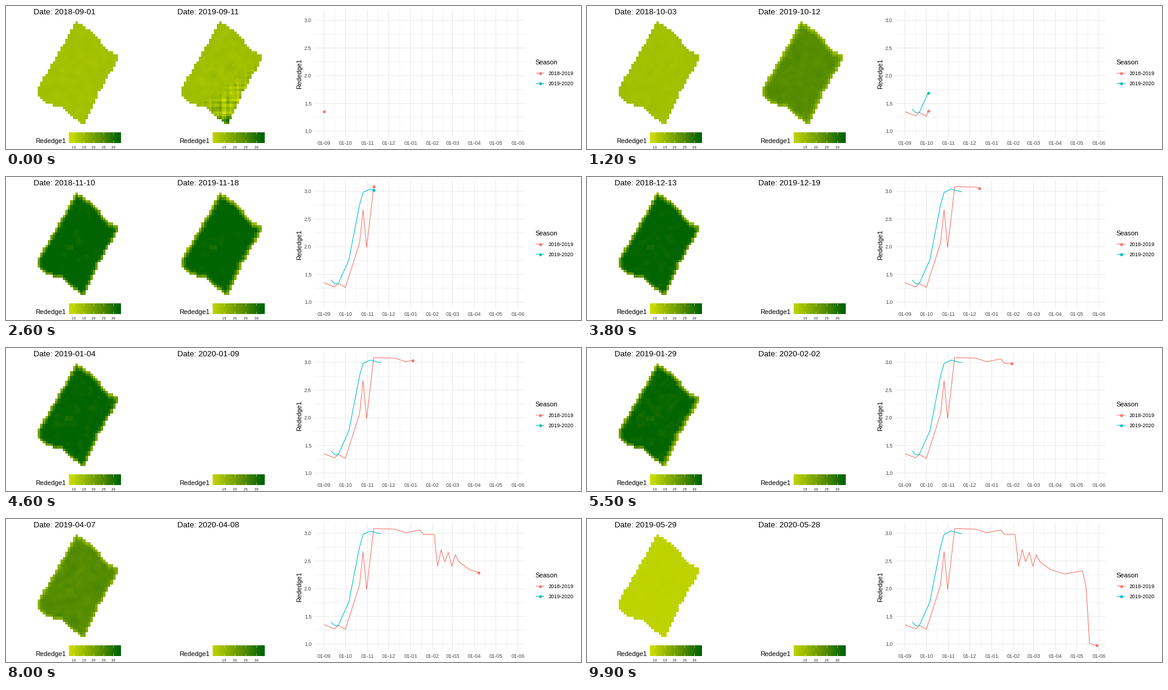
These frames come from a looping animation (960x240 px, 10000 ms). A matplotlib script:

```python
import numpy as np
import matplotlib.pyplot as plt
from matplotlib.animation import FuncAnimation
from matplotlib.colors import LinearSegmentedColormap, Normalize
from matplotlib.path import Path

W, H, DPI, FRAMES = 960, 240, 100, 100
LAST = FRAMES - 1
SPAN_A, SPAN_B, LEAD_B = 270, 260, 10
RED, TEAL, GREY = "#F8766D", "#00BFC4", "#4D4D4D"

plt.rcParams["font.family"] = "Liberation Sans"
rng = np.random.default_rng(11)

# Season means: turning points as (days since 1 September, Rededge1)
RISE_A = [(0, 1.35), (15, 1.275), (20, 1.34), (30, 1.265), (50, 2.065),
          (55, 2.67), (60, 1.985), (70, 3.085), (100, 3.075), (115, 3.01),
          (135, 3.06), (140, 2.98), (155, 2.98)]
SWINGS = [(160 + 5 * i,
           2.727 - .023 * i if i % 2 else 2.445 - .04 * np.cos(np.pi * i / 2))
          for i in range(7)]
FALL_A = [(205, 2.345), (225, 2.265), (250, 2.325), (255, 2.03), (260, 1.01),
          (270, .978)]
CURVE_A = RISE_A + SWINGS + FALL_A
CURVE_B = [(10, 1.4), (15, 1.333), (20, 1.333), (35, 1.763), (50, 2.753),
           (55, 2.98), (65, 3.04), (80, 2.99)]


def sample(curve):
    """Acquisitions every five days along a curve."""
    xs, ys = np.transpose(curve)
    days = np.arange(xs[0], xs[-1] + 1, 5)
    return days, np.interp(days, xs, ys)


def keys(days, span):
    """Animation step on which each acquisition lands."""
    return np.round(days * LAST / span)


DAYS_A, MEAN_A = sample(CURVE_A)
DAYS_B, MEAN_B = sample(CURVE_B)
KEYS_A, KEYS_B = keys(DAYS_A, SPAN_A), keys(DAYS_B, SPAN_A)
MAP_KEYS_B = keys(DAYS_B - LEAD_B, SPAN_B)

# Field outline on a 41 x 32 grid
ROWS, COLS = 41, 32
X0, X1, Y0, Y1 = 53, 187, 26, 198
OUTLINE = [(117, 26), (118.5, 26), (150.8, 49), (163, 67), (174, 76),
           (188, 81.5), (186, 91.5), (155, 146.5), (131, 198), (125, 198),
           (113.4, 187.5), (95, 169), (79, 167), (66, 164), (54, 151.5),
           (54, 136), (78.5, 95)]
row, col = np.mgrid[:ROWS, :COLS]
centres = np.column_stack([X0 + (col.ravel() + .5) * (X1 - X0) / COLS,
                           Y0 + (row.ravel() + .5) * (Y1 - Y0) / ROWS])
inside = Path(OUTLINE).contains_points(centres).reshape(ROWS, COLS)


def neighbour(mask, dr, dc):
    padded = np.pad(mask, 1)
    return padded[1 + dr:1 + dr + ROWS, 1 + dc:1 + dc + COLS]


def depth(dr, dc):
    """0 on the rim facing a direction, 1 behind it, 2 further in."""
    first = inside & neighbour(inside, dr, dc)
    second = first & neighbour(first, dr, dc)
    return first.astype(int) + second


DEPTHS = [depth(0, -1), depth(-1, 0), depth(0, 1), depth(1, 0)]


def texture():
    fine = rng.normal(size=(ROWS, COLS))
    soft = sum(np.roll(fine, (i, j), (0, 1))
               for i in (-1, 0, 1) for j in (-1, 0, 1)) / 3
    return .5 * fine + .7 * soft


base = texture()
TEX_A = [.5 * base + .7 * texture() for _ in DAYS_A]
TEX_B = [.5 * base + .7 * texture() for _ in DAYS_B]
jitter = rng.uniform(.75, 1.1, (ROWS, COLS))
spot = (abs(col - 12) <= 1) & (abs(row - 21.5) < 1)
slope = (COLS / 2 - col + (row - ROWS / 2) * .5) / COLS

# Bare strips in the south-east corner early in the second season
corner = np.clip((row - 14 - (31 - col) * .72) / 8, 0, 1)
strips = corner * (.3 * np.sin(2.2 * col) + .3 * np.sin(2.6 * row)
                   + .15 * base) + 1.1 * (row >= 38)


def bump(k, centre, width):
    return np.exp(-((k - centre) / width) ** 2)


def blend(stack, steps, k):
    pos = np.interp(k, steps, np.arange(len(steps)))
    i = min(int(pos), len(steps) - 2)
    return stack[i] + (pos - i) * (stack[i + 1] - stack[i])


def field(mean, rim, noise):
    """Cell values with a weaker rim (left, top, right, bottom)."""
    loss = np.max([np.clip(w - .45 * d, 0, 1) * (d < 2)
                   for w, d in zip(rim, DEPTHS)], axis=0)
    loss = loss * jitter * 1.4 * max(mean - 1.4, 0)
    loss = loss + spot * .2 * max(mean - 1.8, 0)
    value = mean + loss[inside].mean() - loss + noise
    return np.where(inside, value, np.nan)


def field_a(k):
    mean = np.interp(k, KEYS_A, MEAN_A)
    rise = bump(k, 19, 4)
    amp = np.clip(mean - .95, .1, 1) * (.07 + .06 * rise)
    rim = (.55, .7, .5 + .35 * bump(k, 62, 12), .45)
    noise = amp * blend(TEX_A, KEYS_A, k) + .55 * rise * slope
    return field(mean, rim, noise)


def field_b(k):
    if k > MAP_KEYS_B[-1]:
        return np.full((ROWS, COLS), np.nan)
    mean = np.interp(k, MAP_KEYS_B, MEAN_B)
    noise = .05 * blend(TEX_B, MAP_KEYS_B, k) + max(1 - k / 9, 0) * strips
    return field(mean, (.65, .85, .65, .55), noise)


fig = plt.figure(figsize=(W / DPI, H / DPI), dpi=DPI, facecolor="white")
ax = fig.add_axes([0, 0, 1, 1])
ax.axis("off")

GREENS = LinearSegmentedColormap.from_list(
    "greens", [(0, "#FFFF00"), (.2, "#CFDF00"), (.5, "#8AB100"),
               (.75, "#508900"), (1, "#006400")], N=512)
NORM = Normalize(.125, 3.25)


def px(size):
    return size * 72 / DPI


def label(x, y, s, size, color="black", **kw):
    return ax.text(x, y, s, fontsize=px(size), color=color, **kw)


def stroke(xs, ys, color, width, **kw):
    return ax.plot(xs, ys, color=color, lw=px(width), snap=False,
                   solid_capstyle="butt", **kw)[0]


def dot(x, y, color):
    return ax.plot([x], [y], "o", color=color, ms=px(4.9), mew=0, zorder=5)[0]


def raster(data, box):
    return ax.imshow(data, cmap=GREENS, norm=NORM, extent=box, aspect="auto",
                     interpolation="nearest", zorder=2)


def map_panel(dx, low, high, first):
    title = label(46 + dx, 14, "", 13.2)
    image = raster(np.full((ROWS, COLS), np.nan), (X0 + dx, X1 + dx, Y1, Y0))
    label(49 + dx, 230, "Rededge1", 11)
    left, right = 104.6 + dx, 191 + dx
    raster(np.linspace(low, high, 172)[None], (left, right, 229.7, 212.3))
    for v in np.arange(first, 3.1, .5):
        x = left + (v - low) / (high - low) * (right - left)
        for ys in ((212.3, 215.8), (226.2, 229.7)):
            stroke([x, x], ys, "white", .5, zorder=3)
        label(x, 239, f"{v:.1f}", 5.3, ha="center")
    return title, image


title_a, image_a = map_panel(0, .74, 3.34, 1.0)
title_b, image_b = map_panel(240, .96, 3.34, 1.5)

# Line chart
LEFT, RIGHT, TOP, BOTTOM = 515, 866.5, 5.5, 221.5


def day_x(d):
    return 531 + 1.185 * np.asarray(d)


def val_y(v):
    return 210 - 93 * (np.asarray(v) - 1)


starts = np.arange("2018-09", "2019-07", dtype="datetime64[M]")
months = (starts.astype("datetime64[D]")
          - np.datetime64("2018-09-01")).astype(int)
for width, days, vals in (
        (.53, (months[1:] + months[:-1]) / 2, np.arange(1.25, 3, .5)),
        (1.07, months, np.arange(1, 3.1, .5))):
    for x in day_x(days):
        stroke([x, x], [TOP, BOTTOM], "#EBEBEB", width, zorder=1)
    for y in val_y(vals):
        stroke([LEFT, RIGHT], [y, y], "#EBEBEB", width, zorder=1)

for month, x in zip(starts, day_x(months)):
    label(x, 233, f"01-{str(month)[-2:]}", 8.8, GREY, ha="center")
for v in np.arange(1, 3.1, .5):
    label(510.2, val_y(v) + 3.1, f"{v:.1f}", 8.8, GREY, ha="right")
label(489.7, 114, "Rededge1", 11, rotation=90, ha="center", va="center")

label(883, 98, "Season", 11)
for y, name, color in ((112.7, "2018-2019", RED), (129.8, "2019-2020", TEAL)):
    stroke([884.7, 898.6], [y, y], color, 1.07)
    dot(891.7, y, color)
    label(906, y + 3.2, name, 8.8)


class Season:
    def __init__(self, days, means, steps, color):
        self.x, self.y, self.steps = day_x(days), val_y(means), steps
        self.line = stroke([], [], color, 1.07, zorder=4)
        self.head = dot(np.nan, np.nan, color)

    def show(self, k):
        past = self.steps <= k
        hx = np.interp(k, self.steps, self.x)
        hy = np.interp(k, self.steps, self.y)
        started = past.any()
        self.line.set_data(np.append(self.x[past], [hx] * started),
                           np.append(self.y[past], [hy] * started))
        self.head.set_data([hx], [hy])
        self.head.set_visible(bool(started and k <= self.steps[-1]))


seasons = [Season(DAYS_A, MEAN_A, KEYS_A, RED),
           Season(DAYS_B, MEAN_B, KEYS_B, TEAL)]

ax.set_xlim(0, W)
ax.set_ylim(H, 0)


def date_text(start, span, k):
    return f"Date: {np.datetime64(start) + span * k // LAST}"


def update(k):
    title_a.set_text(date_text("2018-09-01", SPAN_A, k))
    title_b.set_text(date_text("2019-09-11", SPAN_B, k))
    image_a.set_data(field_a(k))
    image_b.set_data(field_b(k))
    for season in seasons:
        season.show(k)
    return []


anim = FuncAnimation(fig, update, frames=FRAMES, interval=100, repeat=True,
                     repeat_delay=0)
plt.show()
```
